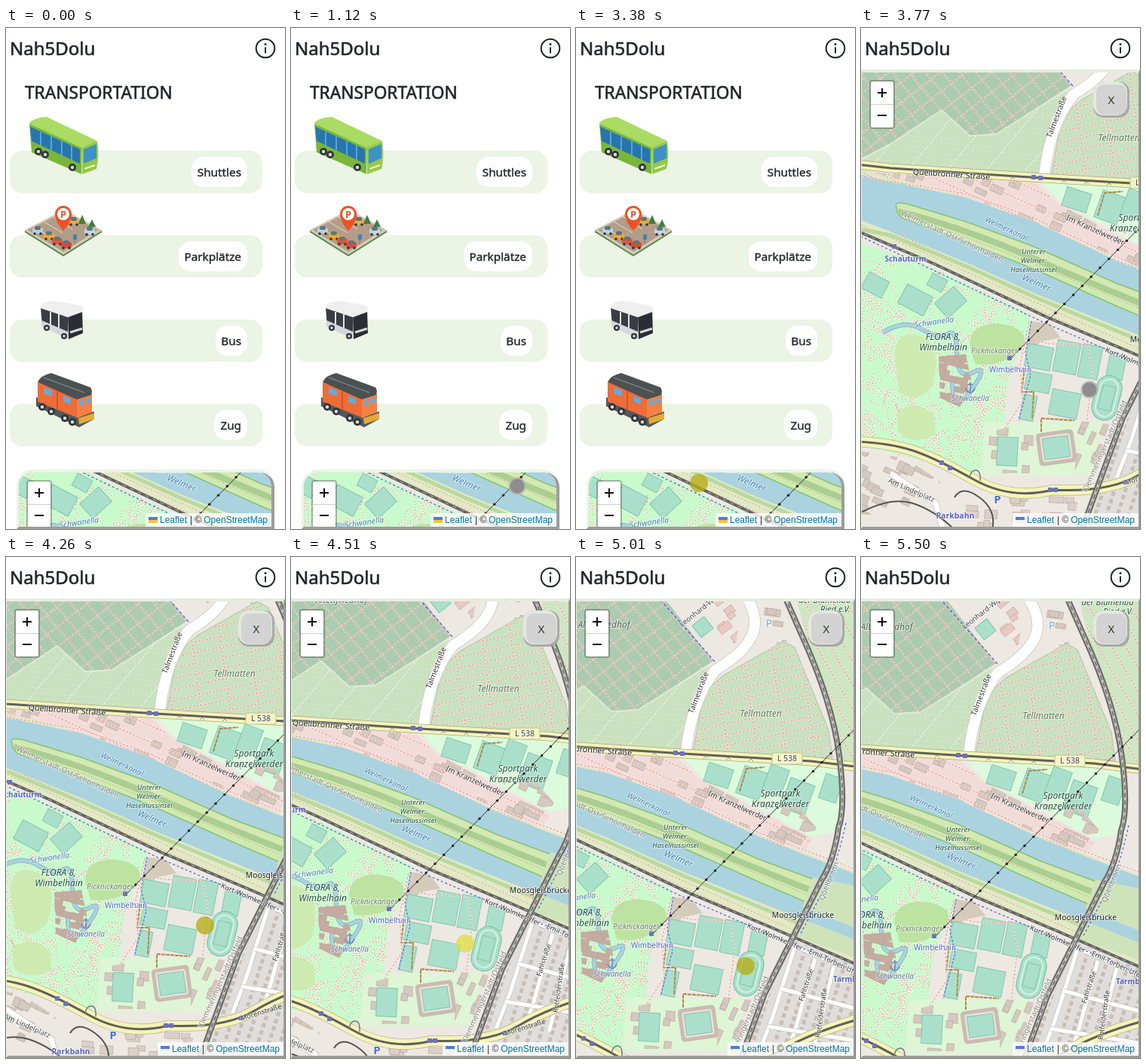
These frames come from a looping animation (370x665 px, 5.77 s). An HTML page with a canvas:

```html
<!DOCTYPE html>
<html lang="de">
<head>
<meta charset="utf-8">
<style>
html, body { margin: 0; width: 100%; height: 100%; overflow: hidden; background: #fff; }
canvas { display: block; }
</style>
</head>
<body>
<canvas id="stage" width="370" height="665"></canvas>
<script>
const LOOP = 5770, TICK = 125;
const UI = '"Noto Sans", sans-serif', LINK = '"Liberation Sans", Arial, sans-serif';
const INK = '#212529', MINT = '#ebf4e5', GREY = '#9c9d98', TRAIL = '#f09a90';
const screen = document.getElementById('stage').getContext('2d');
const MAP_LEFT = 45;
const mapCanvas = Object.assign(document.createElement('canvas'), { width: 485, height: 690 });
let g = screen;

let seed = 7;
const rnd = (a = 0, b = 1) => {
  seed = (seed * 16807) % 2147483647;
  return a + (b - a) * seed / 2147483647;
};
const fill = (d, color) => { g.fillStyle = color; g.fill(new Path2D(d)); };
const line = (d, color, width = 1, dash = []) => {
  g.strokeStyle = color; g.lineWidth = width; g.setLineDash(dash);
  g.stroke(new Path2D(d)); g.setLineDash([]);
};
const disc = (x, y, r, color) => {
  g.fillStyle = color; g.beginPath(); g.arc(x, y, r, 0, 7); g.fill();
};
const box = (x, y, w, h, r, color) => {
  g.fillStyle = color; g.beginPath(); g.roundRect(x, y, w, h, r); g.fill();
};
const within = (d, draw) => { g.save(); g.clip(new Path2D(d)); draw(); g.restore(); };
const turned = (x, y, deg, draw) => {
  g.save(); g.translate(x, y); g.rotate(deg * Math.PI / 180); draw(); g.restore();
};
const text = (s, x, y, font, color = INK, align = 'left') => {
  g.font = font; g.fillStyle = color; g.textAlign = align; g.fillText(s, x, y);
};
// Medium weight: regular glyphs with a hairline outline.
const medium = (s, x, y, size, align) => {
  text(s, x, y, `${size}px ${UI}`, INK, align);
  g.strokeStyle = INK; g.lineWidth = size * .025; g.lineJoin = 'round';
  g.strokeText(s, x, y);
};

// ---- map ----
function label(s, x, y, size, color, deg = 0, style = '') {
  turned(x, y, deg, () => {
    g.font = `${style} ${size}px ${UI}`;
    g.textAlign = 'center'; g.lineJoin = 'round';
    g.strokeStyle = 'rgba(255,255,255,.55)'; g.lineWidth = 2;
    g.strokeText(s, 0, size * .36);
    g.fillStyle = color; g.fillText(s, 0, size * .36);
  });
}
function trail(d, dash = [3, 2]) {
  line(d, 'rgba(255,255,255,.3)', 2.6);
  line(d, TRAIL, 1.2, dash);
}
function rows(area, deg, gap, draw) {
  within(area, () => turned(195, 335, deg, () => {
    for (let y = -500; y < 500; y += gap) draw(`M-500 ${y}H500`);
  }));
}
const trails = (area, deg, gap, dash) => rows(area, deg, gap, d => trail(d, dash));
const hatch = (area, deg, gap, color, width, dash) => rows(area, deg, gap, d => line(d, color, width, dash));

function blocks(area, count, deg, color = '#d5c8bf') {
  within(area, () => {
    const xs = area.match(/-?\d+/g).map(Number);
    const px = xs.filter((_, i) => i % 2 === 0), py = xs.filter((_, i) => i % 2);
    for (let i = 0; i < count; i++) {
      const x = rnd(Math.min(...px), Math.max(...px)), y = rnd(Math.min(...py), Math.max(...py));
      turned(x, y, deg, () => {
        const w = rnd(7, 22), h = rnd(5, 13);
        g.fillStyle = color; g.fillRect(-w / 2, -h / 2, w, h);
        g.strokeStyle = '#bba99d'; g.lineWidth = .7; g.strokeRect(-w / 2, -h / 2, w, h);
      });
    }
  });
}
function footpaths(area, count, x0, x1, y0, y1) {
  within(area, () => {
    for (let i = 0; i < count; i++) {
      const x = rnd(x0, x1), y = rnd(y0, y1), d = () => rnd(-20, 20);
      trail(`M${x} ${y}q${d()} ${d()} ${d()} ${d()}t${d()} ${d()}`, [1.5, 2.5]);
    }
  });
}
function pitch(x, y, w, h, deg = 12) {
  turned(x, y, deg, () => {
    g.fillStyle = '#aae0cb'; g.fillRect(-w / 2, -h / 2, w, h);
    g.strokeStyle = '#86c5ad'; g.lineWidth = 1; g.strokeRect(-w / 2, -h / 2, w, h);
  });
}
function road(d, width, color = '#fff', edge = '#c9c4bd') {
  line(d, edge, width + 1.5); line(d, color, width);
}
function rail(d, width = 4) {
  line(d, '#62625f', width); line(d, '#b5b5b2', 1, [5, 6]);
}

function paintLand() {
  fill('M-45 0H435V690H-45Z', '#ede8e2');
  const cemetery = 'M-45 0H174L240 85L140 150L105 152L68 118L0 163L-45 185Z';
  const plots = 'M-45 187L0 163L68 118L105 152L140 150L236 90L213 130L200 204L-45 192Z';
  const meadow = 'M213 205L228 127L252 105L333 59L348 67L393 177L398 214Z';
  fill(cemetery, '#aacbaf');
  hatch(cemetery, -38, 7, '#bcd8bd', 1, [1, 5]);
  trails(cemetery, -38, 21);
  trails(cemetery, 50, 17);
  fill(plots, '#c9e1bf');
  line('M-45 187L0 163L68 118L105 152L140 150L236 90', '#dfe9d4', 2);
  hatch(plots, 4, 7, '#e7f2df', 1, [1, 5]);
  hatch(plots, -50, 40, '#e7efdf', 1.5, [3, 2]);
  fill(meadow, '#c9e1bf');
  line(meadow, '#a9c3a0');
  hatch(meadow, 30, 7, '#e1efd9', 1, [1, 6]);
  trails(meadow, -12, 14);
  trails(meadow, 82, 38);
  blocks('M180 0L280 0L270 60L243 75Z', 9, -38, '#eac8c4');
  pitch(226, 40, 20, 20, -38);
  blocks('M300 0L335 0L350 55L295 70Z', 6, 8);
  const gardens = 'M350 0H435V220H408L403 177L370 80Z';
  fill(gardens, '#cfe6c3');
  trails(gardens, 60, 16);

  const works = 'M-45 200L190 212L222 242L372 322L360 340L190 266L100 233L-45 208Z';
  fill(works, '#f2dcda');
  blocks(works, 95, 24);
  fill('M200 213L408 224L412 310L370 318L225 240Z', '#dcfbdc');
  pitch(247, 237, 34, 26, 18); pitch(291, 247, 32, 38, 20);
  pitch(323, 243, 26, 36, 20); pitch(352, 265, 34, 42, 20); pitch(396, 254, 24, 34, 18);
  line('M275 258L284 228L308 226', '#a8894c', 2, [5, 1]);
  blocks('M300 270L345 270L380 310L340 315Z', 9, 24);
  trails(works, 24, 20);
}

function paintRiver() {
  const bank = 'M-45 195L100 233L190 266L300 316L435 368V490L348 453L208 393L58 322L-45 278Z';
  fill(bank, '#e1e9c5');
  hatch(bank, 24, 8, TRAIL, 1, [2, 3]);
  fill('M-45 202L0 213L100 234L190 266L300 318L368 345L435 370V458L368 431L300 405L193 362L100 320L0 279L-45 262Z', '#aad3df');
  const island = 'M8 247Q4 238 24 243L100 266L190 299L300 348L368 373L435 396V438L368 407L300 378L193 330L100 293L24 264Q8 260 8 247Z';
  fill(island, '#cdebb0');
  line(island, '#8fbf78', 1.5);
  within(island, () => {
    line('M10 252Q100 275 190 315T435 415', '#aace91', 8);
    line('M10 247Q100 268 190 307T435 407', '#e6e1b5', 1.5);
    line('M14 257Q100 285 190 322T435 426', '#e6a398', 1, [3, 2]);
  });
  line('M-45 275L0 284L100 325L193 367L300 411L435 465', '#b9d99d', 5);
  trail('M-45 205L100 229L190 261L300 313L435 364');
  fill('M372 372L435 385V480L345 450Z', '#cfe3bb');
  fill('M345 406L435 442V458L345 422Z', '#aad3df');
}

function paintPark() {
  const park = 'M-45 292L58 328L186 389L186 405L158 470L145 575L110 602L62 588L-45 562Z';
  fill(park, '#c8facc');
  footpaths(park, 190, -45, 180, 320, 595);
  fill('M105 428Q108 398 148 402Q185 408 176 432Q150 460 112 455Z', '#bce3a0');
  fill('M5 440Q12 405 45 420Q70 440 55 485Q35 510 12 492Z', '#cdebb0');
  fill('M8 520Q30 500 58 522L60 548Q30 565 10 545Z', '#cdebb0');
  pitch(33, 370, 38, 28, 28); pitch(80, 373, 34, 26, -42); pitch(62, 347, 22, 18, 28); pitch(-20, 350, 30, 24, 28);
  const stream = 'M-10 413Q20 395 42 409T76 415T88 442T110 466T107 490T82 478';
  line(stream, '#8cb5cb', 6);
  line(stream, '#aad3df', 4);
  blocks('M64 445L100 442L108 480L92 512L66 500Z', 26, 14, '#c5aba0');
  line('M106 479V492M103 482H109M100 487Q102 493 106 493T112 487', '#6a82c0', 1.5);
}

function paintSouth() {
  const homes = 'M345 455L435 490V690H255L290 585Z';
  fill(homes, '#e0dedc');
  hatch(homes, -72, 14, '#cbbdb3', 5, [6, 4]);
  for (const d of ['M348 465L318 560L300 606', 'M375 480L350 570L340 600', 'M400 490L378 580L370 610',
    'M330 520L435 548', 'M312 570L435 590', 'M345 462L435 500']) road(d, 5);
  fill('M186 398L212 402L226 420L200 425L180 442Z', '#d4cbbb');
  fill('M125 532H282L268 602L120 604Z', '#def5d6');
  const courts = [[197, 446, 34, 31], [234, 446, 31, 42], [265, 452, 26, 44], [196, 479, 33, 25],
    [231, 508, 38, 34], [183, 513, 18, 34], [299, 460, 22, 30]];
  courts.forEach(([x, y, w, h]) => pitch(x, y, w, h, 11));
  turned(287, 500, 14, () => {
    box(-17, -30, 34, 60, 17, '#aae0cb');
    g.strokeStyle = '#79c3a7'; g.lineWidth = 1.2; g.stroke();
    g.beginPath(); g.roundRect(-12, -25, 24, 50, 12);
    g.strokeStyle = '#e0f5eb'; g.lineWidth = 1.5; g.stroke();
    pitch(0, 0, 17, 32, 0);
  });
  blocks('M130 545L190 532L190 600L130 600Z', 7, 5);
  blocks('M245 530L290 535L270 605L245 595Z', 9, -66);
  turned(220, 566, -8, () => {
    box(-25, -22, 50, 44, 5, '#cbbbb0'); box(-20, -17, 40, 34, 3, '#e9e2da'); pitch(0, 0, 34, 28, 0);
  });
  pitch(155, 571, 27, 38, 3);
  line('M178 460L174 492L190 492L188 528M200 545V527L244 530', '#b08b47', 2, [5, 1]);
  trail('M184 400L172 455L175 505L152 540');
  trail('M190 423L210 428L262 430L268 470L260 535');
  line('M187 398L179 440L186 470L170 530', '#5a6ee0', 1.2, [3, 2]);
  blocks('M-45 570L20 580L65 610L75 655L-45 655Z', 28, 24, '#d3c9c0');
  blocks('M100 625L250 632L240 675L100 675Z', 24, 3, '#dad0c8');
  road('M0 600L60 640L70 675', 7);
  const avenue = 'M-45 558Q0 560 30 570T110 608T215 622Q290 626 330 602T435 560';
  road(avenue, 13, '#f5f4b8', '#b6b294');
  line(avenue, '#60605d', 3);
  line('M-45 655Q0 630 30 640T85 675M85 632Q95 615 118 632T135 675', '#555', 2);
  line('M105 607Q106 596 113 596T119 610', '#777', 1.5);
}

function paintLines() {
  road('M204 204Q212 135 243 97Q280 75 291 52T284 0', 14);
  line('M170 4L243 87', '#4a60d8', 1.3, [4, 3]);
  const mainRoad = 'M-45 190L0 195L200 208L370 218L435 226';
  road(mainRoad, 11, '#f5f4b8', '#aaa882');
  line(mainRoad, '#60605d', 3);
  for (const x of [35, 162, 230, 260, 290]) {
    const y = 197 + x * .062;
    line(`M${x - 3} ${y - 3}l6 6m0 -6l-6 6`, '#777', .8);
  }
  line('M-45 283L58 331L208 402L348 462L435 499', '#4a60d8', 1.2, [3, 3]);
  rail('M-45 278L58 322L208 393L320 440L435 490', 4);
  const curve = 'M335 0L358 52Q398 140 407 210T406 307Q400 350 383 377L348 447L308 527L254 675';
  line(curve, '#6b6b68', 8); line(curve, '#c4c3bf', 3.5); line(curve, '#6b6b68', 1.5, [6, 4]);
  line('M416 300Q405 350 393 376L356 447', '#4a60d8', 1.2, [3, 3]);
  line('M160 447L429 174', '#333');
  for (let i = 1; i < 23; i++) disc(160 + i * 11.8, 447 - i * 11.97, 1.7, '#222');
  g.fillStyle = '#6f70c4';
  for (const [x, y] of [[155, 444], [187, 204], [196, 205], [65, 583], [209, 619], [216, 619], [309, 609], [76, 590], [2, 296]])
    g.fillRect(x, y, 6, 6);
}

function paintLabels() {
  const leaf = '#24533f', water = '#4b83b5', dim = '#85857f', stop = '#5865c8', it = 'italic';
  label('Altenfriedhof', 95, 37, 12, '#4c6550', 0, it);
  label('Leonhard-Wip', 221, 18, 9.5, '#444', -38);
  label('der Blumenbu', 388, 4, 11, leaf, 0, it);
  label('Ried e.V.', 402, 16, 11, leaf, 0, it);
  label('P', 314, 35, 14, '#7ba9d8');
  label('Talmestraße', 220, 127, 10, '#333', -69);
  label('Tellmatten', 303, 155, 12, '#5f7d59', 0, it);
  label('Quellbronner Straße', 81, 203, 10.7, '#222', 4);
  box(318, 207, 40, 15, 3, '#f3f3c3'); line('M318 207H358V222H318Z', '#c4c58e');
  label('L 538', 338, 214.5, 10.5, '#444');
  label('Im Kranzelwerder', 272, 277, 10, '#333', 24);
  label('Sportpark', 329, 261, 12, leaf, 0, it);
  label('Kranzelwerder', 329, 275, 12, leaf, 0, it);
  label('Welmerkanal', 154, 275, 10.5, water, 25, it);
  label('Welmerstadt-Ost/Schönhalden', 82, 285, 10.3, dim, 25);
  label('Unterer', 190, 306, 9.5, leaf, 0, it);
  label('Welmer:', 190, 318, 9.5, leaf, 0, it);
  label('Haselnussinsel', 190, 330, 9.5, leaf, 0, it);
  label('Welmer', 194, 347, 12, water, 23, it);
  label('Schauturm', 20, 315, 10, stop, 0, 'bold');
  label('Moosgleisbrücke', 359, 422, 10.3, '#222');
  label('Kurt-Wolmke-Ufer', 322, 451, 9.3, '#333', 23);
  label('Schwanella', 58, 399, 10.5, water, -8, it);
  label('FLORA 8,', 70, 419, 12, leaf, 0, it);
  label('Wimbelhain', 70, 433, 12, leaf, 0, it);
  label('Picknickanger', 138, 437, 10, '#728470', 0, it);
  label('Wimbelhain', 159, 462, 10, stop);
  label('Schwanella', 106, 500, 10, '#6277a8', 0, it);
  label('Klemmeringerstadt/Ostfeld', 284, 564, 10.2, dim, -66);
  label('Quellbronn', 393, 377, 10.2, dim, -68);
  label('Emil-Torben-Ufer', 401, 485, 9.3, '#333', 25);
  label('Fahlstraße', 363, 515, 9, '#333', -72);
  label('Rotfelderstraße', 383, 552, 9, '#333', -82);
  label('Tarmbruck', 426, 507, 10, stop, 0, 'bold');
  label('Morenstraße', 338, 604, 9.3, '#333', -17);
  label('Am Lindelplatz', 28, 622, 9.5, '#444', 24);
  label('P', 142, 635, 15, '#4b70d0', 0, 'bold');
  label('Parkbahn', 86, 656, 10.5, stop, 0, 'bold');
}

function buildMap() {
  g = mapCanvas.getContext('2d');
  g.translate(MAP_LEFT, 0);
  [paintLand, paintRiver, paintPark, paintSouth, paintLines, paintLabels].forEach(paint => paint());
  g = screen;
}

// ---- interface ----
function zoomControl(x, y) {
  box(x, y, 34, 65, 4, 'rgba(0,0,0,.25)');
  box(x + 2, y + 2, 30, 61, 2, '#fff');
  line(`M${x + 2} ${y + 32.5}h30`, '#ccc');
  const cx = x + 17, cy = y + 17;
  line(`M${cx - 6} ${cy}h12M${cx} ${cy - 6}v12M${cx - 6} ${cy + 30}h12`, '#111', 2);
}
function attribution(right, flagLow) {
  const x = right - 167;
  g.fillStyle = 'rgba(255,255,255,.8)'; g.fillRect(x, 644, 167, 18);
  g.fillStyle = '#4c7be1'; g.fillRect(x + 4, 649, 12, 4);
  g.fillStyle = flagLow; g.fillRect(x + 4, 653, 12, 4);
  const font = `12px ${LINK}`;
  text('Leaflet', x + 19, 657, font, '#0078a8');
  text('| ©', x + 59, 657, font, '#333');
  text('OpenStreetMap', right - 5, 657, font, '#0078a8', 'right');
}
function header() {
  medium('Nah5Dolu', 5, 36, 24);
  g.strokeStyle = INK; g.lineWidth = 2;
  g.beginPath(); g.arc(344, 27, 12.3, 0, 7); g.stroke();
  disc(344, 21.5, 1.5, INK);
  line('M344 25.5V33.5', INK, 2);
}
function wheel(x, y, r = 5) { disc(x, y, r, '#30343a'); disc(x, y, r * .45, '#d8dbdd'); }

function coach() {
  fill('M31 127L100 157V194L34 165Z', '#79b63b');
  fill('M100 157L121 150Q124 170 120 187L101 194Z', '#95c94d');
  fill('M31 127Q33 120 54 118L121 150L100 159Z', '#aadb62');
  fill('M32 131L98 161V180L34 150Z', '#2675ae');
  fill('M103 161L120 154V173L103 180Z', '#3c92c4');
  line('M46 138V156M60 144V162M74 150V169M87 156V175', '#6bb7dd', 1.5);
  wheel(43, 164); wheel(52, 168); wheel(88, 185);
  line('M104 187L118 182', '#f5f4c8', 2);
}
function parking() {
  fill('M25 268L77 241L127 268V271L76 303L25 271Z', '#d4c9b9');
  fill('M29 268L77 244L122 268L76 297Z', '#b29d88');
  line('M25 270L76 302L127 270', '#4f8a45', 2);
  line('M37 263L58 277M50 257L75 272M62 250L88 267', '#e5ddd2');
  const cars = [[42, 268, '#b9d2df'], [57, 275, '#f1a82e'], [68, 282, '#e25632'], [80, 287, '#dd4a2f'], [111, 269, '#c2d8e2'], [90, 256, '#e9ac3d']];
  for (const [x, y, color] of cars) {
    box(x - 7, y - 3, 14, 8, 3, color); box(x - 4, y - 5, 8, 5, 2, '#5c7584');
    disc(x - 4, y + 5, 1.8, '#333'); disc(x + 4, y + 5, 1.8, '#333');
  }
  fill('M101 248l5 12h-10ZM114 254l5 10h-10Z', '#3f7f42');
  box(89, 274, 5, 7, 1, '#3c83bd'); line('M91 281v6', '#777');
  fill('M65 248Q67 260 76 269Q86 260 87 248Z', '#ed5227');
  disc(76, 247, 11, '#ed5227'); disc(76, 247, 8, '#fff');
  text('P', 76, 252, `bold 13px ${UI}`, '#ed5227', 'center');
}
function minibus() {
  fill('M46 371L82 381V412L48 396Z', '#3a3b43');
  fill('M82 381L101 374L102 405L83 413Z', '#2c2d34');
  fill('M46 372Q48 363 62 362L98 368Q104 371 101 377L82 384Z', '#efeff0');
  fill('M47 388L82 403V412L48 397Z', '#d6d6dc');
  line('M59 377V393M70 380V398', '#e4e4e8', 2);
  line('M85 404L101 399', '#d7d7dc', 3);
  wheel(54, 398, 4); wheel(77, 409, 4);
}
function train() {
  fill('M40 490L95 516L117 509V519L97 530L40 502Z', '#54585b');
  fill('M42 470L94 491V517L42 496Z', '#ef6c37');
  fill('M94 491L114 485V510L94 518Z', '#f58042');
  fill('M42 470Q46 461 60 458L112 477Q115 481 113 487L94 493Z', '#4b5052');
  line('M50 464L104 484', '#777c7d', 1.5);
  fill('M50 477L61 481V489L50 485ZM76 488L86 492V500L76 496ZM97 495L103 493V500L97 502ZM106 492L112 490V497L106 499Z', '#68a9d8');
  fill('M96 518L117 511V519L97 526Z', '#e4aa38');
  line('M68 482V507', '#c95226', 1.5);
  wheel(48, 503); wheel(60, 509); wheel(78, 518); wheel(88, 523);
}

function listView() {
  medium('TRANSPORTATION', 25, 94, 22.7);
  [['Shuttles', 74], ['Parkplätze', 91], ['Bus', 42], ['Zug', 44]].forEach(([name, width], i) => {
    const y = 163 + i * 112;
    box(5, y, 335, 56, 16, MINT);
    box(320 - width, y + 8, width, 40, 16, '#fff');
    medium(name, 312, y + 34, 15.3, 'right');
  });
  [coach, parking, minibus, train].forEach(draw => draw());
  box(14, 586, 342, 79, [22, 22, 0, 0], MINT);
  within('M340 590Q356 595 356 610V665H14L18 661H352V610Z', () => box(14, 586, 342, 79, [22, 22, 0, 0], GREY));
  g.save();
  g.beginPath(); g.roundRect(17, 590, 335, 72, [18, 18, 0, 0]); g.clip();
  g.drawImage(mapCanvas, 39 - MAP_LEFT, 257);
  zoomControl(27, 600);
  attribution(352, '#f4c63d');
  g.restore();
}
function mapView(dx, dy) {
  g.fillStyle = '#e5ece0'; g.fillRect(0, 55, 370, 610);
  fill('M370 55V665H0L3 661H368V59Z', GREY);
  within('M1 59H368V662H1Z', () => g.drawImage(mapCanvas, dx - MAP_LEFT, dy));
  zoomControl(11, 69);
  attribution(368, '#f4f1dc');
  box(308, 71, 48, 48, 14, '#a9aaa8');
  box(308, 71, 45, 45, 14, '#e3e8df');
  box(312, 75, 40, 40, 10, '#d3d3d3');
  text('X', 332, 101, `15px ${UI}`, '#2d3a2d', 'center');
}

// ---- motion ----
const pointerKeys = [[500, 344, 640], [1000, 300, 608], [1125, 274, 610], [1750, 197, 520], [1875, 218, 473],
  [2000, 177, 457], [2250, 141, 507], [2625, 161, 587], [3000, 163, 604], [3500, 163, 604], [3750, 303, 480],
  [3875, 303, 480], [4250, 264, 489], [4500, 231, 513], [4750, 252, 514], [5000, 225, 543], [5125, 233, 548], [5375, 335, 654]];
const panKeys = [[3500, 39, -9], [3875, 39, -9], [4250, 0, 0], [4500, -28, 20], [4625, -33, 24],
  [4750, -33, 24], [5000, -58, 53], [5125, -61, 56]];
const OPEN = 3500;
const RELEASED = 4500;
const presses = [[3375, 3500], [4000, RELEASED], [4875, 5125]];

function at(keys, t) {
  const i = keys.findIndex(k => k[0] > t);
  if (i < 0) return keys.at(-1).slice(1);
  if (i === 0) return keys[0].slice(1);
  const [a, b] = [keys[i - 1], keys[i]], p = (t - a[0]) / (b[0] - a[0]);
  return [1, 2].map(n => Math.round(a[n] + (b[n] - a[n]) * p));
}
function pointer(t) {
  if (t < 500 || t >= 5500) return;
  const [x, y] = at(pointerKeys, t);
  if (presses.some(([a, b]) => t >= a && t < b)) return disc(x, y, 12, 'rgba(181,173,22,.78)');
  if (t === RELEASED) return disc(x, y, 12, 'rgba(226,221,62,.75)');
  disc(x, y, 11.5, 'rgba(178,178,178,.9)');
  disc(x, y, 9.5, '#8d8d8d');
}
function frame(now) {
  const t = Math.floor((now % LOOP) / TICK) * TICK;
  g.fillStyle = '#fff'; g.fillRect(0, 0, 370, 665);
  header();
  if (t < OPEN) listView(); else mapView(...at(panKeys, t));
  pointer(t);
  requestAnimationFrame(tick);
}
let start;
function tick(now) { start ??= now; frame(now - start); }

buildMap();
requestAnimationFrame(tick);
</script>
</body>
</html>
```
